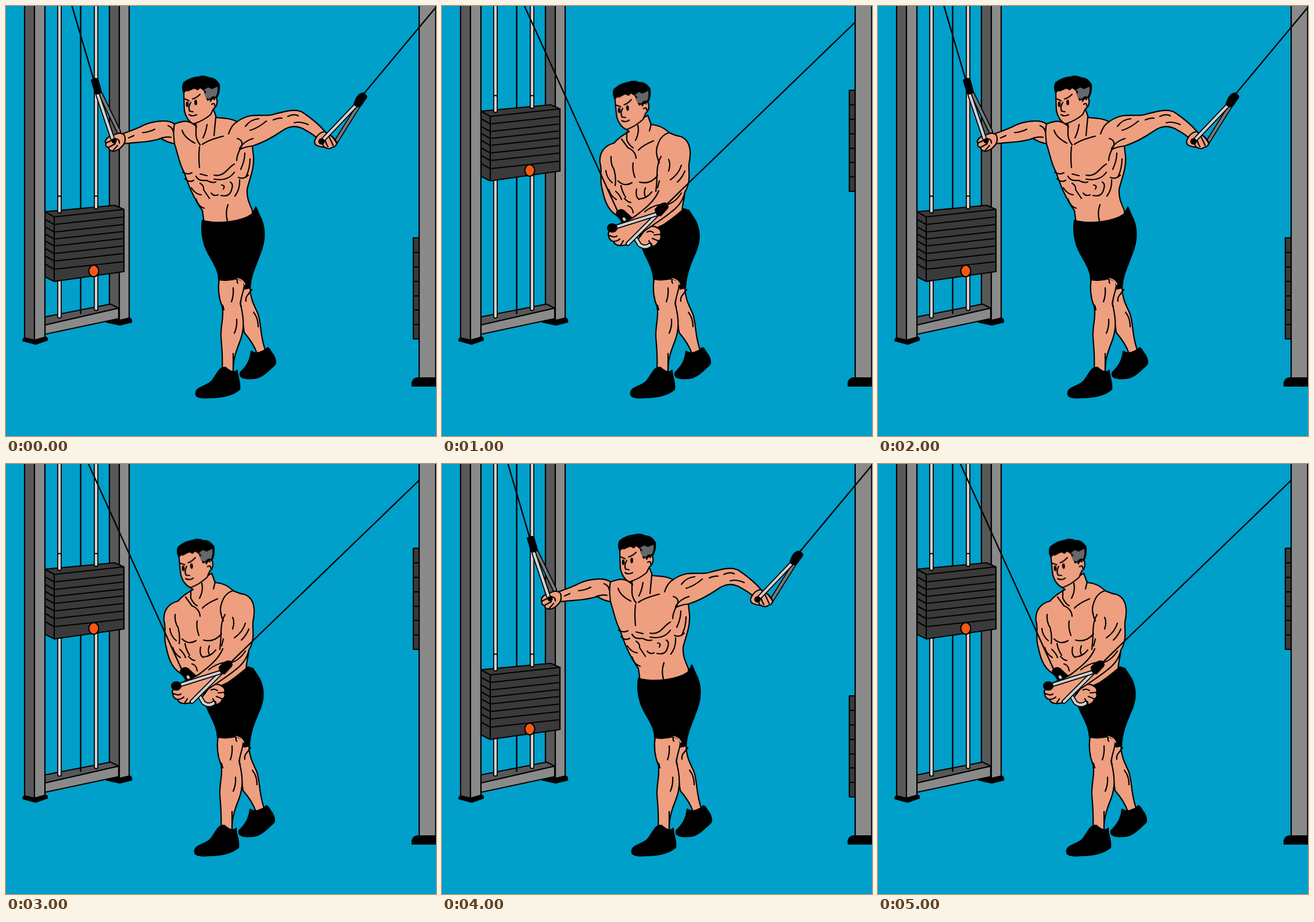
Animation, 740 px wide and 740 px high, one loop 6 s. Source, as an HTML page:

```html
<!DOCTYPE html>
<html lang="en">
<head>
<meta charset="utf-8">
<title>Cable crossover</title>
<style>
html, body { margin: 0; width: 100%; height: 100%; overflow: hidden; background: #00a0ca; }
svg { display: block; width: 100vw; height: 100vh; fill: none; stroke: #000; stroke-width: 2.2; stroke-linecap: round; stroke-linejoin: round; }
.skin { fill: #ee9f80; }
.light { fill: #8a8a8a; }
.dark { fill: #58585a; }
.plate { fill: #3b3a3a; }
.black { fill: #000; }
.edge { stroke-width: 8; stroke: #000; }
.core { stroke-width: 4.4; stroke: #d0d0d0; }
.shade { stroke-width: 4.4; stroke: #77787a; }
.cable { stroke-width: 2.4; }
.open, .closed, .stack, .side-stack, .legs, .head { animation: 2s step-end infinite; }
.open { animation-name: show-first; }
.closed { animation-name: show-second; }
.stack { animation-name: lift; }
.side-stack { animation-name: lift-side; }
.legs { animation-name: lean; }
.head { animation-name: nod; transform-origin: 335px 162px; }
@keyframes show-first { 0% { visibility: visible } 50%, 100% { visibility: hidden } }
@keyframes show-second { 0% { visibility: hidden } 50%, 100% { visibility: visible } }
@keyframes lift { 50%, 100% { transform: translateY(-173px) } }
@keyframes lift-side { 50%, 100% { transform: translateY(-254px) } }
@keyframes lean { 50%, 100% { transform: translateX(-2px) } }
@keyframes nod { 50%, 100% { transform: translate(-7.5px, 9px) rotate(-4deg) } }
</style>
</head>
<body>
<svg viewBox="0 0 740 740">
  <defs>
    <path id="rodA" d="M92 -9V534"/>
    <path id="rodB" d="M155 -9V521"/>
    <path id="capA" d="M92 330V353"/>
    <path id="capB" d="M155 330V346"/>
    <path id="gripL1" d="M158 153L184 230"/>
    <path id="gripL2" d="M163 152L194 216"/>
    <path id="gripR1" d="M602 171L543 233"/>
    <path id="gripR2" d="M607 171L567 235"/>
    <path id="bar1" d="M297 381L370 358"/>
    <path id="bar2" d="M369 360L320 409"/>
    <path id="bar3" d="M313 366L340 411Q350 418 358 411"/>
  </defs>

  <!-- left machine -->
  <path class="black" d="M173 544Q174 538 182 537H212Q217 538 216 544L196 549Z"/>
  <path class="dark" d="M178 -5H195V541L178 536Z"/>
  <path class="light" d="M195 -5H212V537L195 541Z"/>
  <path class="dark" d="M67 535L180 513L194 520L67 549Z"/>
  <path class="light" d="M67 549L194 520V538L67 565Z"/>
  <path class="cable" d="M128.500 0V529"/>
  <use href="#rodA" class="edge"/><use href="#rodA" class="core"/>
  <use href="#rodB" class="edge"/><use href="#rodB" class="core"/>
  <g class="stack">
    <path class="plate" d="M67 354L187 343L203 350V457L83 474L67 466Z"/>
    <path d="M67 354L83 363L203 350M83 363V474"/>
    <path id="seam" d="M67 367L83 376L203 363"/>
    <use href="#seam" y="13"/><use href="#seam" y="25"/><use href="#seam" y="37"/>
    <use href="#seam" y="50"/><use href="#seam" y="63"/><use href="#seam" y="77"/>
    <use href="#capA" class="edge"/><use href="#capA" class="core"/>
    <use href="#capB" class="edge"/><use href="#capB" class="core"/>
    <ellipse cx="151" cy="456" rx="8.500" ry="10" fill="#f45a13"/>
  </g>
  <path class="black" d="M29 576Q29 571 36 569H66Q72 570 71 575L51 582Z"/>
  <path class="dark" d="M32 -5H49V575L32 571Z"/>
  <path class="light" d="M49 -5H67V570L49 575Z"/>

  <!-- right machine -->
  <g class="side-stack">
    <path class="plate" d="M701 399H715V573H701Z"/>
    <path d="M701 424H711M701 449H711M701 474H711M701 499H711M701 523H711M701 548H711"/>
  </g>
  <path class="light" d="M711 -5H739.500V640H711Z"/>
  <path class="black" d="M699 654V648Q701 640 709 640H745V654Z"/>

  <!-- legs -->
  <g class="legs">
    <path class="skin" d="M404 484L420 484C420 503 427 515 433 528C440 546 436 562 446 592L432 598C428 586 422 576 410 562L402 505Z"/>
    <path class="skin" d="M367 468C364 488 367 505 372 517C376 534 369 548 370 570C372 591 373 605 372 626L391 630C390 610 396 594 403 576C411 555 409 536 404 515C402 500 413 488 410 470Z"/>
    <path d="M391 485Q392 499 388 509M373 515L375 523M397 539Q398 552 393 563M391 598V626M423 488L414 500Q412 504 413 508M426 527Q434 537 434 552M404 507Q402 513 405 517"/>
    <path class="black" d="M403 631C411 623 420 614 422 594C428 599 442 598 450 588C455 589 455 596 460 600Q466 612 463 617C453 626 441 640 426 641Q407 643 403 636Z"/>
    <path class="black" d="M327 669C324 654 348 656 356 643C364 632 368 620 378 622Q391 634 398 627C398 639 404 648 402 660C390 670 373 674 352 674Q329 676 327 669Z"/>
  </g>

  <!-- arms open -->
  <g class="open">
    <path class="cable" d="M113 -2L151 127M740 2L615 152"/>
    <use href="#gripL2" class="edge"/><use href="#gripL2" class="shade"/>
    <use href="#gripR2" class="edge"/><use href="#gripR2" class="shade"/>
    <path class="skin" d="M324 198L328 208C315 194 303 198 290 203C278 194 249 198 231 208C218 214 209 217 197 221L205 237C228 234 247 235 267 228Q278 235 290 237C296 255 298 271 306 285C312 302 320 327 338 352L341 374H424L424 352C419 340 414 331 415 315C420 295 427 281 426 260L424 241C443 235 459 226 475 215C486 207 499 205 511 211C521 217 531 222 537 229L549 216C538 203 525 193 512 184C499 175 478 182 462 186C449 191 436 186 420 189Q407 192 398 199C386 193 374 193 362 192L357 178Z"/>
    <path d="M290 203Q287 214 290 237M424 241Q412 242 402 247M327 203V218Q326 228 334 239M346 204Q344 217 339 227M361 191L358 223M303 214Q307 227 325 236M338 238Q349 230 374 224M383 220Q388 204 398 199"/>
    <path d="M333 242Q331 260 333 278M304 286Q312 291 320 287M334 289L346 292M358 291C376 295 381 278 393 272M398 228Q412 232 402 248Q397 258 397 266M411 253Q411 266 404 281M420 263Q420 279 413 294"/>
    <path d="M308 297Q315 305 323 300M319 313Q326 324 336 325M327 293Q331 302 345 300Q354 305 361 303M358 298Q382 302 393 286M334 305Q341 309 340 316L350 331M353 322Q358 328 365 325M371 308Q378 309 374 315M370 326Q386 330 389 313Q391 306 386 303M394 327Q403 315 402 299M327 332Q331 345 341 348M382 342Q377 355 381 370M400 295Q409 299 417 291"/>
    <path d="M279 206Q287 209 288 217M235 218Q247 217 256 212M220 223L211 227M265 228Q277 224 284 226M412 207Q421 195 435 194M420 214Q434 210 448 198M402 245Q409 233 425 228M485 190Q496 185 503 189M496 201Q506 198 520 204M460 196Q470 192 475 193"/>
    <path class="black" d="M338 369C365 376 404 372 424 358L430 346L436 360C448 381 446 406 437 427C430 447 421 463 420 485L411 487L409 474L398 469Q381 474 366 471C366 447 346 430 341 409Q335 389 338 369Z"/>
    <path d="M398 469Q408 471 411 479" stroke="#ee9f80"/>
    <path d="M398 470Q397 475 399 477"/>
    <path class="skin" d="M190 220Q199 217 204 223Q207 232 202 239Q193 250 184 250Q176 248 177 244Q170 242 172 237Q169 231 176 226Z"/>
    <use href="#gripL1" class="edge"/><use href="#gripL1" class="core"/>
    <path d="M172 236L182 231M177 243L188 237M184 249L192 240M187 228Q196 229 195 236M183 230L187 233" />
    <circle class="black" cx="186" cy="232" r="3.500"/>
    <path class="black" d="M147 128Q152 123 158 126L164 148Q160 152 154 151Z"/>
    <path class="skin" d="M548 216Q538 218 533 228Q529 234 533 239Q541 243 548 243Q557 248 562 243Q569 242 569 235Q565 226 557 222Z"/>
    <path d="M548 226Q550 236 554 242M556 225L563 240M542 233L547 242M561 224L568 234"/>
    <use href="#gripR1" class="edge"/><use href="#gripR1" class="core"/>
    <circle class="black" cx="543" cy="233" r="4.500"/>
    <path class="black" d="M599 169Q604 151 614 150Q622 154 620 158L610 172Q604 175 599 169Z"/>
  </g>

  <!-- arms crossed -->
  <g class="closed">
    <path class="skin" d="M316 211L322 216Q304 226 296 236C278 240 270 255 272 270C276 283 271 297 275 312C279 332 284 350 300 360L340 395L413 362C412 345 417 334 418 320C429 302 424 287 425 272C429 253 429 233 412 225Q401 223 391 218Q378 205 360 204L354 188Z"/>
    <path class="black" d="M345 417C357 386 395 371 416 349L425 352L436 369C446 389 443 410 435 427C427 445 420 463 419 485L410 487L407 474L396 469Q378 473 364 470C363 449 352 436 345 417Z"/>
    <path d="M396 469Q406 471 409 479" stroke="#ee9f80"/>
    <path d="M396 470Q395 475 397 477"/>
    <path d="M337 205Q340 218 333 231M360 203L357 215M309 229L320 244Q333 249 334 262M338 248Q345 240 364 232M318 217V231Q323 241 329 244M391 218Q376 222 371 240"/>
    <path d="M291 259Q290 272 296 281Q300 296 298 309M329 270Q327 281 332 295M303 301Q314 312 327 304M340 303Q358 308 371 292M371 240Q366 252 374 270M377 259Q370 270 370 291Q370 304 368 319M390 264Q394 272 390 284"/>
    <path d="M282 283Q283 296 293 304M287 316Q290 327 300 333M308 309Q310 320 316 329M314 331Q320 338 325 338M335 315Q332 327 339 333M350 313Q346 323 351 329M340 332Q353 331 361 320M374 301L371 313M412 274Q407 290 393 299M418 284Q413 296 405 303M299 319Q306 325 309 333M320 344Q328 346 329 356"/>
    <path class="cable" d="M141 -2L303 355M711 28L425 304"/>
    <path class="black" d="M300 356Q306 348 313 352L326 364L311 374Z"/>
    <path class="skin" d="M334 406L351 383Q363 376 371 382Q379 386 376 394Q379 401 372 405Q370 413 361 414Q350 420 341 413Z"/>
    <use href="#bar3" class="edge"/><use href="#bar3" class="core"/>
    <path class="skin" d="M373 318C366 336 348 350 332 362C319 371 300 374 292 384Q284 389 287 396Q288 404 295 405Q298 413 308 412Q320 413 326 403C349 385 373 372 395 354Q414 340 418 320" />
    <path d="M349 354Q360 345 373 342M390 341Q402 337 412 322M288 395Q296 399 301 396M295 405Q302 405 306 401M307 412L312 404M353 389Q359 386 364 390M375 393L365 394M372 404L362 400M361 413L356 404"/>
    <path class="cable" d="M425 304L385 343"/>
    <use href="#bar2" class="edge"/><use href="#bar2" class="core"/>
    <use href="#bar1" class="edge"/><use href="#bar1" class="core"/>
    <ellipse class="black" cx="293" cy="382" rx="8" ry="7"/>
    <path class="black" d="M367 350Q375 339 384 339Q391 343 388 348L376 361Q368 361 367 350Z"/>
  </g>

  <g class="head">
    <path class="skin" d="M306 147Q306 164 307 180C309 190 313 198 322 203Q339 198 352 187L357 177Q365 172 363 160Q357 154 352 162L340 136Z"/>
    <path d="M352 164Q355 157 359 161M354 169Q360 166 359 172"/>
    <path class="black" d="M306 149Q302 140 306 132Q317 123 332 122Q341 119 350 124Q359 123 367 135Q368 147 363 157L353 159L347 162L341 145L334 140L330 144L324 141L313 146L311 143Z"/>
    <path fill="#65676a" stroke="none" d="M341 144L348 140L354 143L364 139Q365 149 361 156Q354 154 351 160L344 158L341 151L345 149Z"/>
    <path d="M308 160L315 163M321 160Q328 158 334 152M318 166Q313 174 316 181L322 182M315 187Q321 191 328 187"/>
    <ellipse class="black" cx="312" cy="169" rx="1.300" ry="3.600"/>
    <ellipse class="black" cx="326.500" cy="166" rx="1.300" ry="3.600"/>
  </g>
</svg>
</body>
</html>
```
